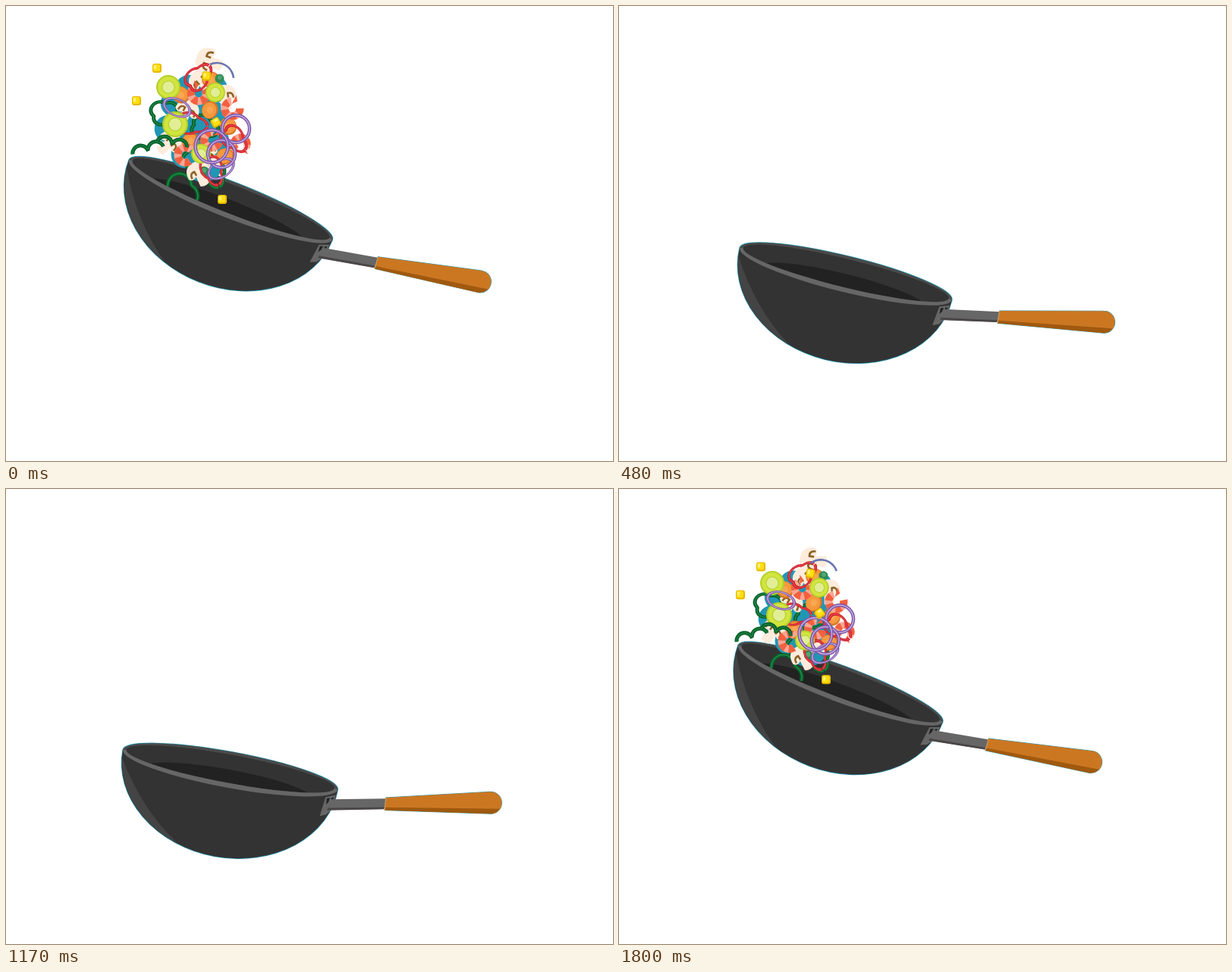
An HTML page with a canvas that plays this animation: 800 by 600 pixels, repeating every 1830 ms.

```html
<!DOCTYPE html>
<html lang="en">
<head>
<meta charset="utf-8">
<title>Wok toss</title>
<style>
html, body { margin: 0; width: 100%; height: 100%; overflow: hidden; background: #fff; }
canvas { display: block; width: 800px; height: 600px; }
</style>
</head>
<body>
<canvas id="stage" width="800" height="600"></canvas>
<script>
const ctx = document.getElementById('stage').getContext('2d');
const LOOP = 1830, STEP = 30, TAU = Math.PI * 2;
const TEAL = '#2196b4';
const FALL = 240;   // time at which the food is halfway back down

// Smooth curve through [time, value] points; "flat" rests at turning points.
function spline(keys, t, flat) {
  let i = 0;
  while (i < keys.length - 2 && t >= keys[i + 1][0]) i++;
  const gap = j => keys[j + 1][0] - keys[j][0];
  const rise = j => (keys[j + 1][1] - keys[j][1]) / gap(j);
  const slope = j => {
    if (j === 0) return rise(0);
    if (j === keys.length - 1) return rise(j - 1);
    const a = rise(j - 1), b = rise(j);
    if (flat && a * b <= 0) return 0;
    return (a * gap(j) + b * gap(j - 1)) / (gap(j) + gap(j - 1));
  };
  const h = gap(i), u = (t - keys[i][0]) / h, v = 1 - u;
  return keys[i][1] * v * v * (1 + 2 * u) + keys[i + 1][1] * u * u * (1 + 2 * v)
    + h * u * v * (slope(i) * v - slope(i + 1) * u);
}

// Wok key poses: time, rim centre, tilt in degrees
const poses = [
  [0, 296.1, 255.6, 21.4],      // top of the toss
  [240, 305.1, 298.8, 20.25],
  [480, 298.9, 353.3, 13.8],
  [720, 295.5, 377.6, 10.66],   // food caught
  [1170, 295.6, 370.2, 10.48],
  [1450, 290.5, 459.5, -3.4],   // lowest point
  [1620, 248, 375.4, 8],        // swing back
  [1800, 291.8, 256.7, 20.6]
];
const track = n => [-LOOP, 0, LOOP].flatMap(d => poses.map(p => [p[0] + d, p[n]]));
const [xs, ys, tilts] = [1, 2, 3].map(track);
const wokAt = t => ({
  x: spline(xs, t, true), y: spline(ys, t, true),
  tilt: spline(tilts, t, true) * Math.PI / 180
});

function fill(color) { ctx.fillStyle = color; ctx.fill(); }
function stroke(color, width) { ctx.strokeStyle = color; ctx.lineWidth = width; ctx.stroke(); }
function oval(x, y, rx, ry = rx) { ctx.beginPath(); ctx.ellipse(x, y, rx, ry, 0, 0, TAU); }
function poly(color, ...pts) {
  ctx.beginPath();
  pts.forEach(p => ctx.lineTo(...p));
  ctx.closePath();
  fill(color);
}

function wokBack() {
  oval(0, 0, 144, 23.5);
  stroke(TEAL, 1.4);
  fill('#4a4a4a');
  oval(0, -1, 139.5, 18.7);
  fill('#333');
  ctx.save();
  ctx.clip();
  oval(0, 17, 112, 17);
  fill('#222');
  ctx.restore();
}

function wokFront() {
  ctx.beginPath();
  ctx.ellipse(0, 0, 144, 116, 0, Math.PI, 0, true);
  stroke(TEAL, 1.4);
  ctx.ellipse(0, -1, 139.5, 18.7, 0, 0, Math.PI);
  fill('#333');

  ctx.beginPath();
  ctx.ellipse(0, 0, 143.5, 115.5, 0, Math.PI * .97, Math.PI * .615, true);
  ctx.quadraticCurveTo(-106, 72, -142.8, 11);
  fill('#444');

  ctx.beginPath();
  ctx.ellipse(0, 0, 144, 24, 0, Math.PI, 0, true);
  ctx.ellipse(0, -1, 139.5, 18.7, 0, 0, Math.PI);
  fill('#666');
}

function handle() {
  poly('#666', [130, 12.5], [143, 7.5], [141, 27], [135, 35], [127, 38.5]);
  poly('#222', [132, 14], [136, 12.5], [135, 18], [132.5, 22]);
  poly('#222', [138, 12], [141, 11], [140.5, 15], [138, 16]);
  poly('#666', [136, 14.5], [209.5, 0], [208.7, 14.2], [135, 29]);
  poly('#4b4747', [135.5, 26], [208.7, 11.6], [208.7, 14.4], [135, 29.4]);

  ctx.beginPath();
  ctx.moveTo(208.3, -1);
  ctx.lineTo(342, -33.6);
  ctx.arc(345.5, -19.5, 14.5, -1.81, 1.33);
  ctx.lineTo(209.8, 15.3);
  ctx.closePath();
  stroke(TEAL, 1);
  fill('#cb7722');
  poly('#a0590f', [209.3, 11.8], [358.8, -14], [355, -8.6], [349, -5.4], [209.8, 15.3]);
  ctx.beginPath();
  ctx.moveTo(208.3, -1);
  ctx.lineTo(209.8, 15.3);
  stroke('#d99a55', 1);
}

// Ingredients, each drawn around its own middle
function lobes(r) {
  ctx.beginPath();
  for (let a = 0; a <= TAU + .01; a += .1) {
    const d = r * (.72 + .28 * Math.abs(Math.cos(1.5 * a)));
    ctx.lineTo(d * Math.cos(a), d * Math.sin(a));
  }
}
const capShape = new Path2D('M-14 2Q-14-13 0-13Q14-13 14 2Q10 7 5 3L6 15Q0 19-6 15L-5 3Q-10 7-14 2Z');
const gills = new Path2D('M-10 3Q-10-4-4-3L-4 2M10 3Q10-4 4-3L4 2');
const draw = {
  gap(r) { oval(0, 0, r); fill(TEAL); },
  green(r) { lobes(r); stroke('#07602a', 5); stroke('#23924a', 1.3); },
  red(r) { lobes(r); stroke('#cf1f2c', 4.2); stroke('#ee5a5c', 1); },
  onion(r) { oval(0, 0, r); stroke('#7d55a8', 4.4); stroke('#c3a9de', 1.6); },
  lime(r) {
    oval(0, 0, r); fill('#b4cf2a');
    oval(0, 0, r * .87); fill('#d2e43f');
    oval(0, 0, r * .55); fill('#b9d435');
    oval(0, 0, r * .47); fill('#e2ee96');
  },
  carrot(r) {
    oval(0, 0, r); fill('#d8752a');
    oval(-.8, -.8, r * .87); fill('#f6983c');
    oval(0, 0, r * .4); fill('#f8a752');
  },
  pea(r) { oval(0, 0, r); fill('#2f8a57'); oval(-1, -1, r * .5); fill('#51a673'); },
  corn(r) {
    ctx.beginPath(); ctx.roundRect(-r, -r, 2 * r, 2 * r, 3); fill('#e6b800');
    ctx.beginPath(); ctx.roundRect(-r + 1, -r + 1, 2 * r - 3, 2 * r - 3, 2); fill('#ffdf12');
    ctx.fillStyle = '#fff07a';
    ctx.fillRect(-r + 2, -r + 2, 3, 5);
  },
  mushroom(r) {
    ctx.scale(r / 14, r / 14);
    ctx.fillStyle = '#fdebdb';
    ctx.fill(capShape);
    ctx.strokeStyle = '#8b6126';
    ctx.lineWidth = 2.2;
    ctx.stroke(gills);
  },
  shrimp(r) {
    ctx.beginPath();
    ctx.arc(0, 0, r, .4, 5);
    stroke('#fba694', r);
    ctx.setLineDash([r * .7, r * .45]);
    stroke('#f2603f', r);
    ctx.setLineDash([]);
    poly('#f2603f', [r * .2, -r * .6], [r * 1.2, -r * 1.4], [r, -r * .6]);
  },
  strip(r) {
    ctx.beginPath();
    ctx.arc(-r / 2, 2, r / 2, Math.PI * 1.05, -.3);
    ctx.arc(r / 2, 2, r / 2, Math.PI * 1.1, -.15);
    stroke('#07602a', 5);
    stroke('#1d8743', 1.2);
  },
  sliver(r) {
    ctx.beginPath();
    ctx.arc(0, 0, r, -2.3, -.4);
    stroke('#6674b0', 2.6);
  }
};

const food = [];
const frac = n => n - Math.floor(n);

// Spreads pieces evenly over a round heap aloft and a taller column on the way down.
let seed = 0;
function scatter(kind, count, size, squash = 1, spread = 1) {
  for (let i = 0; i < count; i++) {
    seed++;
    const u = (2 * frac(seed * .7549) - 1) * spread;
    const v = .5 + (frac(seed * .5698) - .5) * (spread + 1) / 2;
    const belly = Math.sin(Math.PI * v), lean = 8 * Math.cos(TAU * v);
    food.push({
      kind, size, squash,
      x: 257 + lean + u * (8 + 48 * belly), y: 84 + 142 * v,
      x2: 334 + lean + u * (24 + 20 * belly), y2: 145 + 172 * v,
      turn: 2.6 * (frac(seed * .618) - .5), spin: 3 * (frac(seed * .414) - .5)
    });
  }
}

// A piece that stands out: place aloft, then place on the way down.
function piece(kind, size, [x, y], [x2, y2], turn = 0, spin = 0) {
  food.push({ kind, size, x, y, x2, y2, turn, spin, squash: 1 });
}

scatter('gap', 18, 18, 1, .7);
scatter('green', 4, 19, .85);
piece('green', 25, [229, 246], [305, 280], .5, .2);
scatter('mushroom', 6, 16);
piece('mushroom', 17, [266, 72], [360, 160], -1.2, 1.9);
scatter('carrot', 6, 12, .9);
scatter('pea', 3, 6);
scatter('shrimp', 4, 10);
piece('shrimp', 9, [309, 182], [395, 314], 1.8, -1.6);
scatter('red', 4, 21, .7);
scatter('lime', 2, 13);
piece('lime', 16, [214, 107], [368, 206]);
piece('lime', 17, [223, 156], [330, 324]);
scatter('onion', 2, 18, .6);
piece('onion', 18, [303, 162], [348, 254]);
piece('onion', 18, [284, 195], [342, 301]);
piece('onion', 21.5, [271, 185], [351, 313]);
piece('strip', 21, [187, 190], [265, 198], -.25, .25);
piece('strip', 20, [219, 182], [286, 183], .2, -.35);
piece('sliver', 22, [278, 97], [362, 128], .3, 1.9);
piece('corn', 6, [199, 82], [302, 187]);
piece('corn', 6, [172, 125], [283, 238]);
piece('corn', 6, [285, 255], [282, 292]);
scatter('corn', 2, 6);

// Resting depth inside the bowl, following its tilt
const restY = (wok, x) => wok.y + 60 + Math.tan(wok.tilt) * (x - wok.x) * .85;
const scoop = wokAt(1530);

function place(f, t, wok) {
  if (t <= FALL) {
    const dx = f.x - 245, x0 = scoop.x - 10 + dx * .5;
    return [
      spline([[-300, x0], [-210, 185 + dx * .85], [-30, f.x - 12], [0, f.x], [FALL, f.x2]], t),
      spline([[-300, restY(scoop, x0)], [-210, 270 + f.y * .5],
        [-30, 32 + f.y * .86], [0, f.y], [FALL, f.y2]], t)
    ];
  }
  const s = t - FALL;
  const x = f.x2 + (wok.x - f.x2) * Math.min(1, s / 200) * .4;
  return [x, Math.min(f.y2 + .7 * s + .0027 * s * s, restY(wok, x))];
}

function toss(t, wok) {
  if (t < -300 || t > 450) return;
  for (const f of food) {
    ctx.save();
    ctx.translate(...place(f, t, wok));
    ctx.rotate(f.turn + f.spin * t / FALL);
    ctx.scale(1, f.squash);
    draw[f.kind](f.size);
    ctx.restore();
  }
}

function inWok(wok, ...parts) {
  ctx.save();
  ctx.translate(wok.x, wok.y);
  ctx.rotate(wok.tilt);
  parts.forEach(part => part());
  ctx.restore();
}

function frame(now) {
  const t = Math.floor((now % LOOP) / STEP) * STEP;
  const wok = wokAt(t);
  ctx.fillStyle = '#fff';
  ctx.fillRect(0, 0, 800, 600);
  inWok(wok, wokBack);
  toss(t > LOOP / 2 ? t - LOOP : t, wok);
  inWok(wok, wokFront, handle);
}

const start = performance.now();
function tick() {
  frame(performance.now() - start);
  requestAnimationFrame(tick);
}
tick();
</script>
</body>
</html>
```
